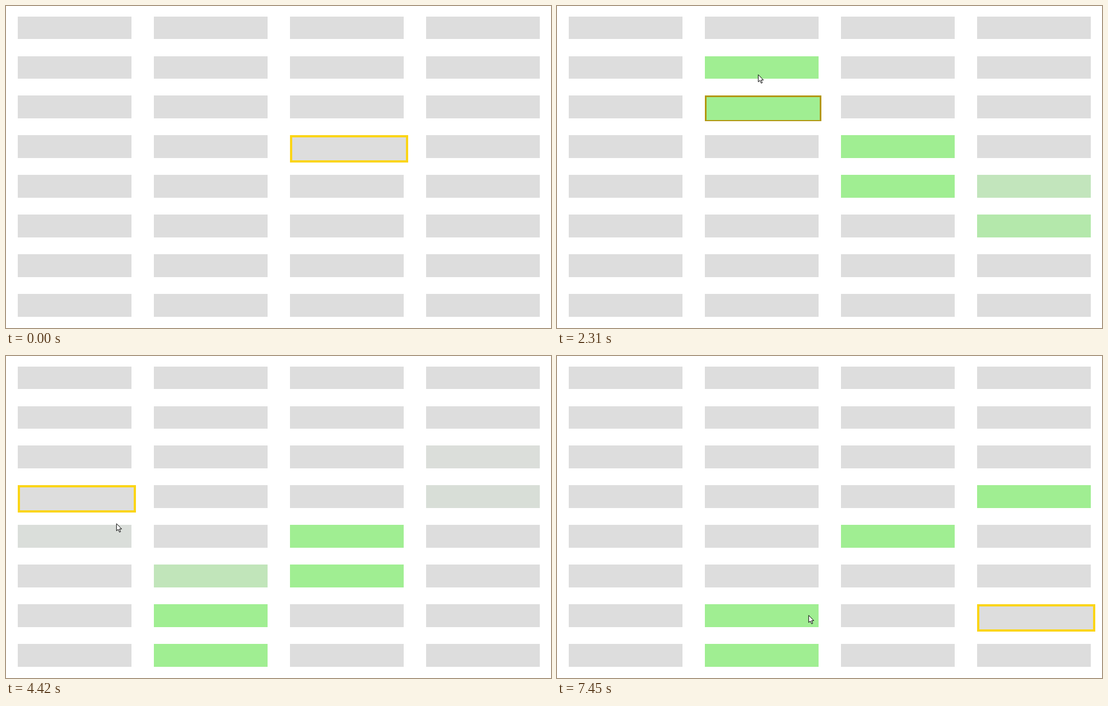
An HTML page with a canvas that plays this animation: 973x576 px, repeating every 7.51 s.

```html
<!DOCTYPE html>
<html lang="en">
<head>
<meta charset="utf-8">
<title>Hover grid</title>
<style>
  html, body { margin: 0; width: 100%; height: 100%; overflow: hidden; background: #fff; }
  canvas { display: block; width: 973px; height: 576px; }
</style>
</head>
<body>
<canvas id="stage" width="973" height="576"></canvas>
<script>
const ctx = document.getElementById('stage').getContext('2d');
const LOOP = 7510, FADE = 300, HOLD = 1000;
const COLS = 4, ROWS = 8, UNIT = 1.35, W = 150 * UNIT, H = 30 * UNIT;
const GRAY = [221, 221, 221], GREEN = [160, 238, 146], GOLD = [251, 213, 22], BLACK = [0, 0, 0];

// Pointer moves: departure in ms, pace in px per ms, then straight legs to each point
const ENTER = [580, 568];
const moves = [
  [150, .6, [584, 545]],
  [378, 2.6, [600, 262]],
  [610, 2.4, [700, 198]],
  [1160, 2.4, [818, 388]],
  [1800, 2.4, [359, 123]],
  [2664, 2.4, [368, 240]],
  [2780, 2.4, [376, 199]],
  [3022, 2.4, [660, 120], [852, 274]],
  [3637, 3.1, [690, 305], [423, 459], [402, 530]],
  [4250, 1.8, [198, 303]],
  [4420, 3.2, [175, 195], [200, 266]],
  [5110, 3, [500, 300], [620, 452], [628, 377]],
  [5880, 1.6, [840, 120], [850, 180]],
  [6640, 3, [700, 310], [490, 367], [425, 522], [428, 464]],
  [7320, .16, [449, 464]]
];
// The framed cell is always the one the pointer will click next
const clicks = [600, 1400, 2185, 2880, 3196, 3950, 4640, 5460, 6200, 6930];
const LAST_GOAL = 3 * ROWS + 6;

const left = c => 21 + 243 * c;
const rowTop = r => 18.65 + 70.91 * r;

function cellAt([x, y]) {
  const c = Math.floor((x - left(0)) / 243), r = Math.floor((y - rowTop(0)) / 70.91);
  const inside = c >= 0 && c < COLS && r >= 0 && r < ROWS && x < left(c) + W && y < rowTop(r) + H;
  return inside ? c * ROWS + r : -1;
}

const track = [];
let spot = ENTER;
for (const [go, pace, ...points] of moves) {
  let t = go;
  track.push([t, ...spot]);
  for (const p of points) {
    t += Math.hypot(p[0] - spot[0], p[1] - spot[1]) / pace;
    track.push([t, ...p]);
    spot = p;
  }
}

function pointer(t) {
  const i = track.findIndex(p => p[0] > t);
  if (i < 0) return spot;
  const [t0, x0, y0] = track[i - 1], [t1, x1, y1] = track[i];
  const u = (t - t0) / (t1 - t0);
  return [x0 + (x1 - x0) * u, y0 + (y1 - y0) * u];
}

// Times at which the pointer enters each cell
const entries = Array.from({ length: COLS * ROWS }, () => []);
for (let t = track[0][0], was = -1; t < LOOP; t += 4) {
  const cell = cellAt(pointer(t));
  if (cell >= 0 && cell !== was) entries[cell].push(t);
  was = cell;
}
const goals = [...clicks.map(t => cellAt(pointer(t))), LAST_GOAL];

// cubic-bezier(.25, .1, .25, 1)
function ease(u) {
  if (u <= 0) return 0;
  if (u >= 1) return 1;
  let lo = 0, hi = 1;
  for (let i = 0; i < 20; i++) {
    const s = (lo + hi) / 2, x = .75 * s * (1 - s) + s ** 3;
    if (x < u) lo = s; else hi = s;
  }
  return .3 * lo * (1 - lo) ** 2 + 3 * lo * lo * (1 - lo) + lo ** 3;
}

const glow = age => Math.min(ease(age / FADE), 1 - ease((age - HOLD) / FADE));
const mix = (a, b, p) => `rgb(${a.map((v, i) => Math.round(v + (b[i] - v) * p))})`;

// Rectangle with its edges on whole pixels
function fillBox(x, y, w, h, color) {
  const [x0, y0, x1, y1] = [x, y, x + w, y + h].map(Math.round);
  ctx.fillStyle = color;
  ctx.fillRect(x0, y0, x1 - x0, y1 - y0);
}

function drawCell(i, t, frame) {
  const x = left(Math.floor(i / ROWS)), y = rowTop(i % ROWS);
  const b = frame > 0 ? UNIT * Math.max(1, Math.floor(3 * frame)) : 0;
  if (b) fillBox(x, y, W + 2 * b, H + 2 * b, mix(BLACK, GOLD, frame));
  const g = Math.max(0, ...entries[i].map(e => glow(t - e)));
  fillBox(x + b, y + b, W, H, mix(GRAY, GREEN, g));
}

const arrow = new Path2D('M0 0V13L3 10.3L5.3 15.3L7.3 14.4L5.1 9.6H9.2Z');

function drawPointer([x, y]) {
  ctx.save();
  ctx.translate(Math.round(x) + .3, Math.round(y) - .2);
  ctx.fillStyle = '#fff';
  ctx.strokeStyle = '#000';
  ctx.fill(arrow);
  ctx.stroke(arrow);
  ctx.restore();
}

function draw(t) {
  fillBox(0, 0, 973, 576, '#fff');
  const done = clicks.filter(c => c <= t).length;
  const frame = done ? ease((t - clicks[done - 1]) / FADE) : 1;
  for (let i = 0; i < COLS * ROWS; i++) drawCell(i, t, i === goals[done] ? frame : 0);
  if (t >= track[0][0]) drawPointer(pointer(t));
}

const began = performance.now();
function tick() {
  draw((performance.now() - began) % LOOP);
  requestAnimationFrame(tick);
}
tick();
</script>
</body>
</html>
```
